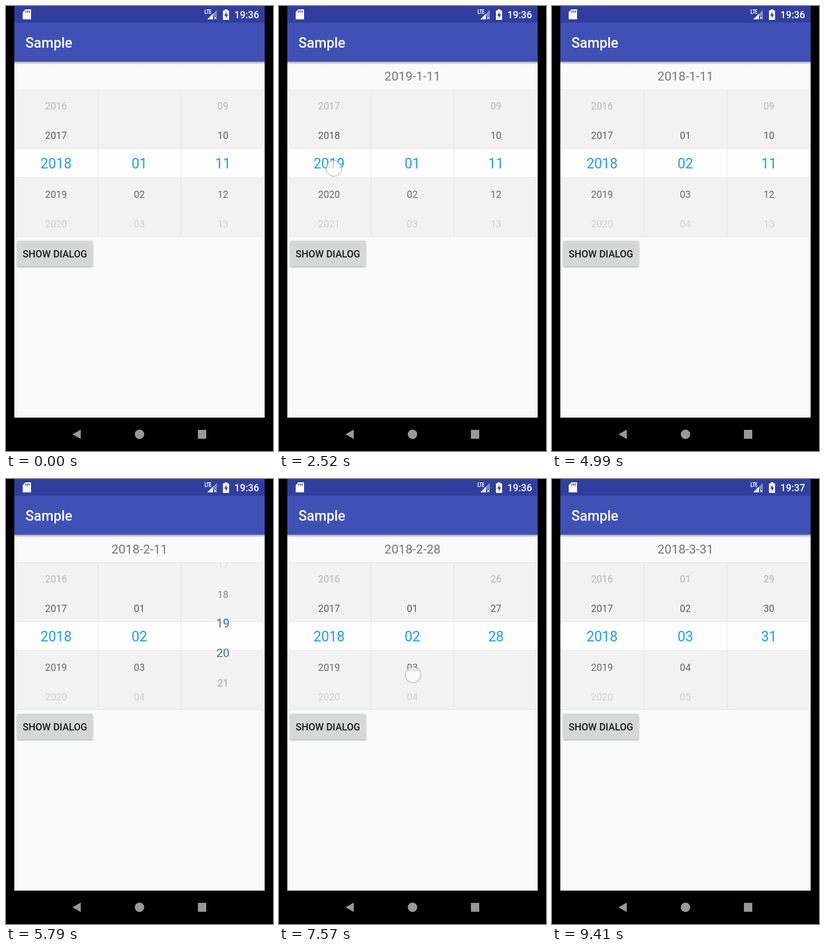
An HTML page with a canvas for the animation above (9.47 s loop, 480x800 px).

```html
<!DOCTYPE html>
<html lang="en">
<head>
<meta charset="utf-8">
<title>Date picker</title>
<style>
html, body { margin: 0; width: 100%; height: 100%; overflow: hidden; background: #000; }
canvas { display: block; width: 480px; height: 800px; }
</style>
</head>
<body>
<canvas id="stage" width="480" height="800"></canvas>
<script>
const ctx = document.getElementById('stage').getContext('2d');
const LOOP = 9470;
const FONT = 'Roboto, sans-serif';

// Wheel geometry
const TOP = 150, BOTTOM = 414.5, ROW = 53, BASE = 291.7;
const SMALL = 17.5, LARGE = 25;
const PICKED = [33, 155, 243];

// A swipe drags its wheel while the finger is down, then the wheel glides to rest.
const SLOP = 10, GLIDE = 2.3, FADE = 90;
const swipes = [
  { wheel: 'year', down: 1320, lift: 1640, rest: 1890, from: [98, 345], to: [99, 299], pace: 1.5, value: 2019 },
  { wheel: 'year', down: 2290, lift: 2730, rest: 2980, from: [98, 282], to: [102, 332], pace: 2.5, value: 2018 },
  { wheel: 'month', down: 4130, lift: 4800, rest: 5075, from: [242, 357], to: [256, 310], pace: 1.5, value: 2 },
  { wheel: 'day', down: 5280, lift: 5540, rest: 6190, from: [402, 352], to: [452, 71], pace: 1.4, value: 21 },
  { wheel: 'day', down: 6310, lift: 6645, rest: 7170, from: [402, 350], to: [452, 93], pace: 1.4, value: 28 },
  { wheel: 'month', down: 7570, lift: 7780, rest: 8030, from: [241, 352], to: [247, 306], pace: 1.4, value: 3 },
  { wheel: 'day', down: 8830, lift: 9140, rest: 9410, from: [408, 350], to: [447, 220], pace: 1.4, value: 31 }
];

const labels = [
  [1890, '2019-1-11'], [2980, '2018-1-11'], [5100, '2018-2-11'], [6190, '2018-2-21'],
  [7170, '2018-2-28'], [8030, '2018-3-28'], [9410, '2018-3-31']
];

const progress = (t, start, end) => Math.max(0, Math.min(1, (t - start) / (end - start)));

function fingerAt(s, t) {
  const u = Math.pow(progress(t, s.down, s.lift), s.pace);
  return s.from.map((a, i) => a + (s.to[i] - a) * u);
}

function valueAt(wheel, start, t) {
  let value = start;
  for (const s of swipes) {
    if (s.wheel !== wheel || t < s.down) continue;
    const drag = s.from[1] - fingerAt(s, t)[1];
    if (Math.abs(drag) > SLOP) value += drag / ROW;
    const glide = 1 - Math.pow(1 - progress(t, s.lift, s.rest), GLIDE);
    value += (s.value - value) * glide;
  }
  return value;
}

function rect(x, y, w, h, color) {
  ctx.fillStyle = color;
  ctx.fillRect(x, y, w, h);
}

function shape(points, color) {
  ctx.fillStyle = color;
  ctx.beginPath();
  for (const [x, y] of points) ctx.lineTo(x, y);
  ctx.fill();
}

function disc(x, y, r, color) {
  ctx.fillStyle = color;
  ctx.beginPath();
  ctx.arc(x, y, r, 0, 7);
  ctx.fill();
}

function text(str, x, y, size, color, align = 'left', weight = 400) {
  ctx.font = `${weight} ${size}px ${FONT}`;
  ctx.textAlign = align;
  ctx.fillStyle = color;
  ctx.fillText(str, x, y);
}

function statusBar(t) {
  const blue = '#303f9f';
  rect(15, 0, 450, 30, blue);
  shape([[35, 6], [45, 6], [45, 24], [30, 24], [30, 11]], '#fff');
  for (const x of [35, 38, 41]) rect(x, 8, 1.5, 4, blue);

  shape([[379, 7], [379, 24], [362, 24]], '#838cc5');
  shape([[372, 14], [372, 24], [362, 24]], '#fff');
  rect(372, 18, 8, 7, blue);
  ctx.strokeStyle = '#fff';
  ctx.lineWidth = 1.3;
  ctx.beginPath();
  ctx.moveTo(374, 19); ctx.lineTo(378.5, 23.5);
  ctx.moveTo(378.5, 19); ctx.lineTo(374, 23.5);
  ctx.stroke();
  // Network label in narrow strokes
  ctx.beginPath();
  ctx.moveTo(358, 6); ctx.lineTo(358, 13.5); ctx.lineTo(361, 13.5);
  ctx.moveTo(360.5, 6.6); ctx.lineTo(365, 6.6);
  ctx.moveTo(362.8, 6.6); ctx.lineTo(362.8, 14);
  ctx.moveTo(369, 6.6); ctx.lineTo(366.2, 6.6); ctx.lineTo(366.2, 13.5); ctx.lineTo(369, 13.5);
  ctx.moveTo(366.2, 10); ctx.lineTo(368.5, 10);
  ctx.stroke();

  rect(393, 6, 5, 3, '#fff');
  rect(390, 8, 11, 17, '#fff');
  shape([[396.3, 10], [392.3, 17.5], [395, 17.5], [395, 22.5], [399, 15], [396.3, 15]], blue);
  text(t < 9180 ? '19:36' : '19:37', 455, 22, SMALL, '#fff', 'right', 500);
}

function frame(t) {
  rect(0, 0, 480, 800, '#000');
  rect(15, 30, 450, 710, '#fafafa');
  statusBar(t);

  rect(15, 30, 450, 70, '#3f51b5');
  text('Sample', 35, 75, 25, '#fff', 'left', 500);
  const shade = ctx.createLinearGradient(0, 100, 0, 105);
  shade.addColorStop(0, 'rgba(70,70,70,.5)');
  shade.addColorStop(1, 'rgba(70,70,70,0)');
  rect(15, 100, 450, 5, shade);

  const label = labels.filter(l => t >= l[0]).pop();
  if (label) text(label[1], 240, 134, 22.5, '#757575', 'center');
}

function button() {
  ctx.save();
  ctx.shadowColor = 'rgba(50,50,50,.4)';
  ctx.shadowBlur = 3;
  ctx.shadowOffsetY = 1.5;
  ctx.fillStyle = '#d6d7d7';
  ctx.beginPath();
  ctx.roundRect(20, 422, 136, 46, 2.5);
  ctx.fill();
  ctx.restore();
  text('SHOW DIALOG', 88, 452, SMALL, '#1b1b1b', 'center', 500);
}

function navBar() {
  const gray = '#999';
  shape([[119.5, 770], [134.5, 761.5], [134.5, 778.5]], gray);
  disc(240, 770, 8.5, gray);
  rect(345, 762, 15, 16, gray);
}

function wheel(x, value, min, max) {
  const near = Math.round(value);
  const middle = BASE - TOP, height = BOTTOM - TOP;
  for (let n = Math.max(min, near - 3); n <= Math.min(max, near + 3); n++) {
    const shift = (n - value) * ROW;
    const focus = Math.max(0, 1 - Math.abs(shift) / ROW);
    const y = middle + shift;
    const alpha = Math.max(0, shift > 0 ? (height - y) / (height - middle) : y / middle);
    const rgb = PICKED.map(c => Math.round(c * focus));
    text(String(n).padStart(2, '0'), x, BASE + shift, SMALL + (LARGE - SMALL) * focus,
      `rgba(${rgb},${alpha})`, 'center');
  }
}

function picker(t) {
  rect(15, TOP, 450, BOTTOM - TOP, '#f2f2f2');
  rect(15, 257, 450, 51, '#fefefe');
  const line = '#e6e6ea';
  for (const y of [150, 256, 308, 414]) rect(15, y, 450, 1, line);
  for (const x of [165, 314]) rect(x, TOP, 1, BOTTOM - TOP, line);

  ctx.save();
  ctx.beginPath();
  ctx.rect(15, TOP, 450, BOTTOM - TOP);
  ctx.clip();
  wheel(90, valueAt('year', 2018, t), 1900, 2100);
  wheel(239.7, valueAt('month', 1, t), 1, 12);
  wheel(390, valueAt('day', 11, t), 1, t >= 5100 && t < 8030 ? 28 : 31);
  ctx.restore();
}

function finger(t) {
  for (const s of swipes) {
    if (t < s.down || t > s.lift + FADE) continue;
    const [x, y] = fingerAt(s, t);
    ctx.globalAlpha = 1 - progress(t, s.lift, s.lift + FADE);
    disc(x, y, 14, 'rgba(255,255,255,.6)');
    ctx.strokeStyle = 'rgba(140,140,140,.45)';
    ctx.lineWidth = 1.8;
    ctx.stroke();
    ctx.globalAlpha = 1;
  }
}

function draw(t) {
  frame(t);
  picker(t);
  button();
  navBar();
  finger(t);
}

const begin = performance.now();
function tick() {
  draw((performance.now() - begin) % LOOP);
  requestAnimationFrame(tick);
}
tick();
</script>
</body>
</html>
```
